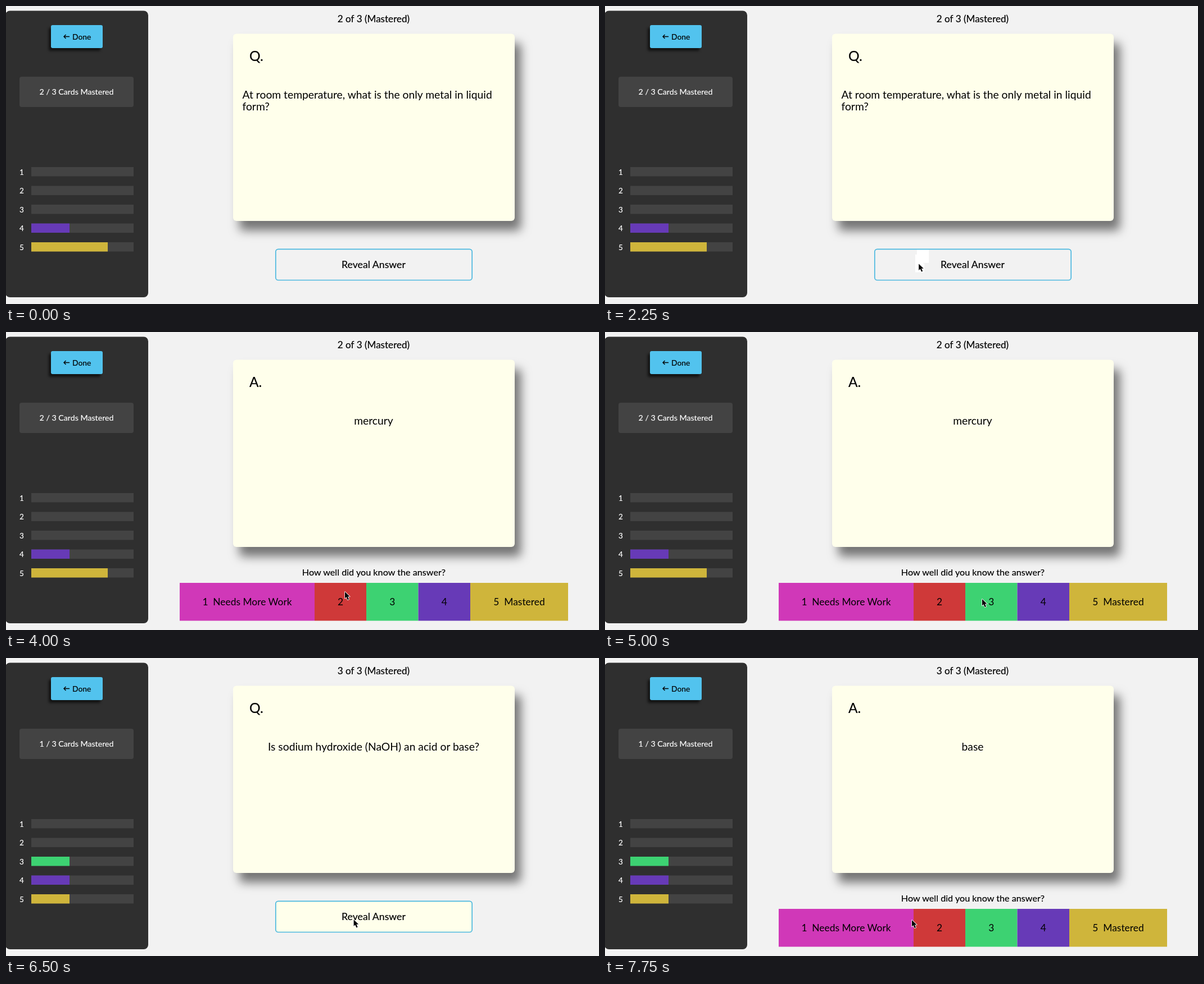
Animation of 1055x531 px, one loop 8000 ms. Source, as an HTML page:

```html
<!DOCTYPE html>
<html lang="en">
<head>
<meta charset="utf-8">
<title>Flashcards</title>
<style>
  html, body { margin: 0; width: 100%; height: 100%; overflow: hidden; background: #f2f2f2; }
  svg { display: block; width: 1055px; height: 531px; font-family: Lato, "Open Sans", sans-serif; }
  .medium { stroke: currentColor; stroke-width: .18px; }
  .light { color: #fff; fill: #fff; }
  .done { filter: drop-shadow(-4px 5px 2px rgba(0, 0, 0, .6)); }
  .card { filter: drop-shadow(11px 17px 9px rgba(0, 0, 0, .52)); }
</style>
</head>
<body>
<svg id="stage" viewBox="0 0 1055 531"></svg>
<script>
const LOOP = 8000, STEP = 250;
const APPEAR = 500, REVEAL_1 = 4000, NEXT_CARD = 5250, PRESS = 7250, REVEAL_2 = 7500;
const CREAM = '#ffffeb', TRACK = '#434343';
const COLORS = ['#d038b8', '#cf3939', '#3dd272', '#673ab7', '#cfb53b'];
const BUTTON_TOP = 434;

// Pointer moves; bend below 1 lets x run ahead of y
const ENTRY = { x: 648, y: 186 };
const MOVES = [
  { from: 600, to: 1950, x: 553, y: 459, bend: .5 },
  { from: 2000, to: 3250, x: 603, y: 463 },
  { from: 4400, to: 5000, x: 671, y: 476 },
  { from: 5500, to: 5800, x: 639, y: 469 },
  { from: 6000, to: 6600, x: 617, y: 466 },
  { from: 7500, to: 7750, x: 546, y: 467 }
];

const smooth = u => u * u * (3 - 2 * u);
const progress = (t, from, to) => smooth(Math.min(1, Math.max(0, (t - from) / (to - from))));

function pointerAt(t) {
  return MOVES.reduce((p, { from, to, x, y, bend = 1 }) => {
    const e = progress(t, from, to);
    return { x: p.x + (x - p.x) * e ** bend, y: p.y + (y - p.y) * e };
  }, ENTRY);
}

const rect = (x, y, w, h, fill, extra = '') =>
  `<rect x="${x}" y="${y}" width="${w}" height="${h}" fill="${fill}" ${extra}/>`;

const text = (x, y, size, content, style = '', anchor = 'middle') =>
  `<text x="${x}" y="${y}" font-size="${size}" text-anchor="${anchor}" class="${style}">${content}</text>`;

function sidebar(mastered, levels) {
  const rows = levels.map((count, i) => {
    const y = 287 + i * 33.5;
    return text(24, y + 13.5, 13.5, i + 1, 'medium light', 'start') +
      rect(45, y, 182, 16.5, TRACK) +
      rect(45, y, count * 68, 16.5, COLORS[i]);
  });
  return rect(-1, 8.5, 254, 510.5, '#2f2f2f', 'rx="8"') +
    rect(80, 34, 92, 41, '#52c3ee', 'rx="3" class="done"') +
    '<path d="M113 54.5H103M106.5 51l-3.5 3.5 3.5 3.5" fill="none" stroke="#000" stroke-width="1.4"/>' +
    text(118, 59.5, 13.8, 'Done', 'medium', 'start') +
    rect(24, 126, 203, 54, TRACK, 'rx="4"') +
    text(125.5, 158, 14.2, `${mastered} / 3 Cards Mastered`, 'medium light') +
    rows.join('');
}

function card(letter, lines) {
  const [x, anchor] = lines.length > 1 ? [420.5, 'start'] : [654, 'middle'];
  return rect(404, 49.5, 501, 333.5, CREAM, 'rx="6" class="card"') +
    text(433, 98, 24.5, letter, 'medium', 'start') +
    lines.map((line, i) => text(x, 164.5 + i * 21.5, 19.3, line, '', anchor)).join('');
}

// White patches where the moving pointer has repainted the button
function hoverTrail(t) {
  let out = '';
  for (let s = APPEAR + STEP; s <= t; s += STEP) {
    const a = pointerAt(s - STEP), b = pointerAt(s);
    const left = Math.min(a.x, b.x) - 1, right = Math.max(a.x, b.x) + 10;
    const top = Math.max(BUTTON_TOP, Math.min(a.y, b.y)), bottom = Math.max(a.y, b.y) + 15;
    if (bottom > top) out += rect(left, top, right - left, bottom - top, '#fff');
  }
  return out;
}

function revealButton(t) {
  const pressed = t >= PRESS, dy = pressed ? 2 : 0;
  const fill = pressed ? '#fff' : t >= NEXT_CARD ? CREAM : 'none';
  return (t < REVEAL_1 ? hoverTrail(t) : '') +
    rect(479.8, 433.3 + dy, 349.4, 55.2, fill, 'rx="4.5" stroke="#4bb8df" stroke-width="1.7"') +
    text(654, 467 + dy, 17.7, 'Reveal Answer', 'medium');
}

function ratingButtons() {
  const edges = [309, 549, 641, 733.5, 826, 1000];
  const labels = ['1\u00a0 Needs More Work', '2', '3', '4', '5\u00a0 Mastered'];
  return text(654.5, 434, 16.2, 'How well did you know the answer?', 'medium') +
    labels.map((label, i) => {
      const x = edges[i], w = edges[i + 1] - x;
      return rect(x, 447, w, 67.5, COLORS[i]) + text(x + w / 2, 487, 17.4, label);
    }).join('');
}

function pointer(t) {
  if (t < APPEAR) return '';
  const { x, y } = pointerAt(t);
  return `<path transform="translate(${x} ${y})"
    d="M0 0V11.6l2.6-2.4 2.2 5 2.2-1-2.2-4.8H8.6z" stroke="#fff" stroke-width="1.6"
    paint-order="stroke" stroke-linejoin="round"/>`;
}

function scene(t) {
  const second = t >= NEXT_CARD;
  const revealed = t >= (second ? REVEAL_2 : REVEAL_1);
  const question = second ? ['Is sodium hydroxide (NaOH) an acid or base?']
    : ['At room temperature, what is the only metal in liquid', 'form?'];
  const answer = [second ? 'base' : 'mercury'];
  return sidebar(second ? 1 : 2, second ? [0, 0, 1, 1, 1] : [0, 0, 0, 1, 2]) +
    text(654, 28.5, 17.1, `${second ? 3 : 2} of 3 (Mastered)`, 'medium') +
    card(revealed ? 'A.' : 'Q.', revealed ? answer : question) +
    (revealed ? ratingButtons() : revealButton(t)) +
    pointer(t);
}

const stage = document.getElementById('stage');
const start = performance.now();
let shown = -1;

function draw() {
  const t = Math.floor(((performance.now() - start) % LOOP) / STEP) * STEP;
  if (t !== shown) stage.innerHTML = scene(shown = t);
  requestAnimationFrame(draw);
}
draw();
</script>
</body>
</html>
```
